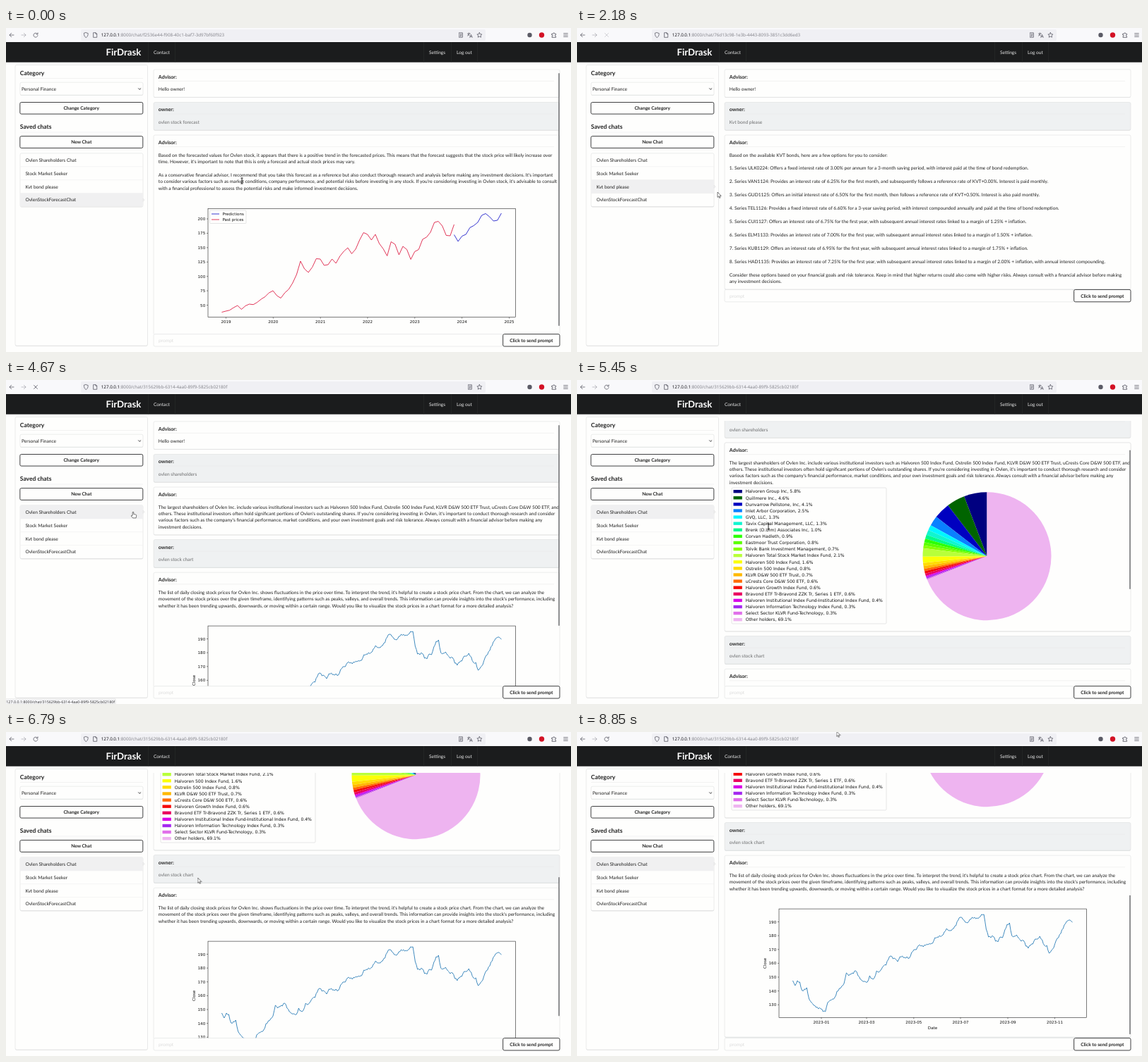
These frames come from a looping animation (800x460 px, 8880 ms). An HTML page:

```html
<!DOCTYPE html>
<html lang="en">
<head>
<meta charset="utf-8">
<title>Finance chat</title>
<style>
html,body{margin:0;width:800px;height:460px;overflow:hidden;background:#fefefd}
svg{display:block}
text{font:6.61px Lato,sans-serif;fill:#212121;text-rendering:geometricPrecision;white-space:pre}
.bold{font-weight:700}
.h4{font-size:7.08px;font-weight:700}
.h3{font-size:8.5px;font-weight:700}
.brand{font-size:13.2px;font-weight:700;fill:#fff}
.nav{fill:#e8e8e8}
.dim{fill:#6b6c6d}
.hint{fill:#dcdcdc}
.url{font-family:"Noto Sans",sans-serif;font-size:6.22px;fill:#15141a}
.tip{font-family:"Noto Sans",sans-serif;font-size:5.37px;fill:#333}
.tick{font-family:"DejaVu Sans",sans-serif;font-size:5.57px;fill:#111}
.leg{font-family:"DejaVu Sans",sans-serif;font-size:6.1px;fill:#111}
.mid{text-anchor:middle}
.end{text-anchor:end}
.ico{fill:none;stroke:#5b5b66;stroke-width:.8;stroke-linecap:round;stroke-linejoin:round}

/* one loop: 1% = 88.8 ms */
.a,.b,.c,.pie,.bare,.low,.reload,.stop,.lang,.reader,.tipB,.tipC,.hovB,.hovC,.beam,.arrow,.hand{animation:8880ms step-end infinite}
.a{animation-name:a}.b{animation-name:b}.c{animation-name:c}
.pie{animation-name:pie}.bare{animation-name:bare}.low{animation-name:low}
.reload{animation-name:reload}.stop{animation-name:stop}
.lang{animation-name:lang}.reader{animation-name:reader}
.tipB{animation-name:tipB}.tipC{animation-name:tipC}
.hovB{animation-name:hovB}.hovC{animation-name:hovC}
.beam{animation-name:beam}.arrow{animation-name:arrow}.hand{animation-name:hand}
@keyframes a{0%{opacity:1}22.5%{opacity:0}}
@keyframes b{0%,51%{opacity:0}22.5%{opacity:1}}
@keyframes c{0%{opacity:0}51%{opacity:1}}
@keyframes pie{0%{opacity:0}54.6%{opacity:1}}
@keyframes bare{0%{opacity:1}54.6%{opacity:0}}
@keyframes low{0%{transform:translateY(-200px)}54.6%{transform:none}}
@keyframes reload{0%,27%,54.6%{opacity:1}21.4%,50%{opacity:0}}
@keyframes stop{0%,27%,54.6%{opacity:0}21.4%,50%{opacity:1}24.3%{opacity:.3}}
@keyframes lang{0%,54.6%{opacity:1}51%{opacity:0}}
@keyframes reader{0%,54.6%{transform:none}51%{transform:translateX(13px)}}
@keyframes tipB{0%,22.5%{opacity:0}10.6%{opacity:1}}
@keyframes tipC{0%,54.6%{opacity:0}42.2%{opacity:1}}
@keyframes hovB{0%,22.5%{opacity:0}10.6%{opacity:1}}
@keyframes hovC{0%,51%{opacity:0}42.2%{opacity:1}}
@keyframes beam{0%,56%{opacity:1}9%,64%{opacity:0}}
@keyframes arrow{0%,10.6%,42.2%,56%{opacity:0}9%,22.7%,54.6%,64%{opacity:1}}
@keyframes hand{0%,22.7%,54.6%{opacity:0}10.6%,42.2%{opacity:1}}

@property --s{syntax:'<number>';inherits:true;initial-value:0}
.view{animation:scroll 8880ms cubic-bezier(.3,.5,.4,1) infinite}
.roll{transform:translateY(calc(var(--s)*-1px))}
.thumb{transform:translateY(calc(var(--s)*.563px))}
@keyframes scroll{
0%,59.6%{--s:0}61.3%,61.8%{--s:63}63.6%,68.5%{--s:126}
70.3%,73.2%{--s:189}75%,80%{--s:252}81.6%,to{--s:298}}
.cursor{animation:move 8880ms ease-in-out infinite}
@keyframes move{
0%,3.4%{transform:translate(334px,217px)}
10.6%{transform:translate(192px,226px)}
13.5%{transform:translate(160px,226px)}
20.3%{transform:translate(170px,226px)}
22.5%{transform:translate(184px,228px)}
24.5%,40.5%{transform:translate(199px,233px)}
42.2%{transform:translate(193px,191px)}
46.4%{transform:translate(160px,192px)}
50%{transform:translate(174px,188px)}
52.6%,54%{transform:translate(180px,187px)}
57.4%,63.6%{transform:translate(271px,208px)}
70%,87.4%{transform:translate(271.5px,207px)}
97.3%,to{transform:translate(367.5px,-1px)}}
</style>
</head>
<body>
<script>
const esc = s => s.replace(/&/g, '&amp;');
const text = (x, y, s, cls = '', size = 6.61) =>
  `<text x="${x}" y="${y + size * .365}" class="${cls}">${esc(s)}</text>`;
const rect = (x, y, w, h, fill, more = '') =>
  `<rect x="${x}" y="${y}" width="${w}" height="${h}" fill="${fill}" ${more}/>`;
const line = (x1, y1, x2, y2, c = '#e4e4e4', w = .5) =>
  `<path d="M${x1} ${y1}L${x2} ${y2}" stroke="${c}" stroke-width="${w}"/>`;
const poly = (pts, c) =>
  `<path d="M${pts.map(p => p.map(n => n.toFixed(2))).join('L')}" fill="none" stroke="${c}" stroke-width=".85" stroke-linejoin="round"/>`;
const icon = (d, more = '') => `<path class="ico" d="${d}" ${more}/>`;
const group = (cls, ...parts) => `<g class="${cls}">${parts.join('')}</g>`;

const EDGE = 'stroke="#d9dada" stroke-width=".5" rx="2"';
const DARK = 'stroke="#2b2c2d" stroke-width=".9" rx="2"';
const PITCH = 9.44;

const panel = (x, y, w, h, fill = '#fefefd') =>
  rect(x, y + .8, w, h, '#e3e4e4', 'rx="2"') + rect(x, y, w, h, fill, EDGE);
const lines = (y, rows, cls) =>
  rows.map((s, i) => s && text(215.8, y + i * PITCH, s, cls)).join('');
const heading = (y, who) =>
  text(215.8, y + 10.4, who + ':', 'h4', 7.08) + line(216, y + 16.6, 776, y + 16.6);
const cardHeight = n => 39.5 + (n - 1) * PITCH;
function card(y, who, rows, h = cardHeight(rows.length)) {
  const user = who === 'owner';
  return panel(209, y, 575, h, user ? '#eff1f2' : '#fefefd') + heading(y, who) +
    lines(y + 28.2, rows, user ? 'dim' : '');
}
const greeting = card(58.8, 'Advisor', ['Hello owner!']);
const button = (x, y, w, h, s) =>
  rect(x, y, w, h, '#fefefd', DARK) + text(x + w / 2, y + h / 2, s, 'bold mid');
const prompt = y => rect(209, y, 494, 17.4, '#fefefd', EDGE) +
  text(216, y + 8.8, 'prompt', 'hint') + button(703.7, y, 80.3, 17.4, 'Click to send prompt');
const thumb = (h, cls = '') => rect(782.2, 64, 1.6, h, '#77787a', `rx=".8" class="${cls}"`);

function axes(top, yTicks, yPos, xTicks) {
  const low = top + 154.3;
  let out = '';
  for (const v of yTicks)
    out += line(284, yPos(v), 286, yPos(v), '#111', .5) + text(282.2, yPos(v), '' + v, 'tick end', 5.57);
  for (const [x, s] of xTicks)
    out += line(x, low, x, low + 2, '#111', .5) + text(x, low + 6.3, s, 'tick mid', 5.57);
  return out + rect(286, top, 435.3, 154.3, 'none', 'stroke="#111" stroke-width=".55"');
}
const range = (from, to, step) =>
  Array.from({ length: (to - from) / step + 1 }, (_, i) => from + i * step);

function forecastChart() {
  const past = [403.5, 402, 400.7, 397, 394, 399.5, 394.5, 392, 392.7, 389.5, 385, 381.5, 376, 373, 380,
    383.5, 376, 371, 362, 350, 331, 342, 347, 339.5, 327.5, 328, 337, 336, 328, 334,
    324, 317, 312, 320.5, 314, 301, 290.5, 293, 301, 293, 306, 313.5, 323.5, 303.5, 307,
    322, 310, 314.5, 328.5, 317.5, 314.5, 300, 297, 290, 276, 274.5, 281, 294.5, 295, 279];
  const next = [293.5, 303, 295.5, 293, 283.5, 280.5, 276, 266, 263.5, 268, 274, 273, 263];
  const months = (ys, x) => ys.map((y, i) => [x + i * 5.576, y]);
  const red = '#dc143c', blue = '#1414c8';
  return axes(256.4, range(50, 200, 25), v => 393.5 - (v - 50) * .8167,
      range(2019, 2025, 1).map((y, i) => [311.5 + i * 66.83, '' + y])) +
    poly(months(next, 634.5), blue) + poly(months(past, 305.5), red) +
    rect(288.5, 259, 51.5, 18.5, '#fefefd', 'stroke="#ccc" stroke-width=".5" rx="1"') +
    line(291, 264, 302, 264, blue, .85) + text(306.4, 264, 'Predictions', 'tick', 5.57) +
    line(291, 272, 302, 272, red, .85) + text(306.4, 272, 'Past prices', 'tick', 5.57);
}

function closeChart() {
  const ys = [353, 360, 353, 355, 367, 365, 363, 379, 384, 388, 391, 393, 393, 397, 397, 384, 381, 379, 377, 368,
    364, 361, 357, 342, 346, 344, 343, 339, 346, 351, 354, 354, 355, 346, 350, 349, 339, 341, 337, 332,
    331, 323, 318, 322, 322, 326, 319, 318, 320, 319, 321, 313, 309, 309, 303, 304, 305, 303, 302, 301,
    300, 292, 291, 289, 289, 284, 279, 282, 282, 279, 275, 267, 263, 266, 270, 271, 266, 263, 263, 264,
    263, 259, 259, 280, 291, 292, 290, 297, 298, 291, 292, 281, 273, 271, 289, 290, 288, 293, 297, 296,
    304, 307, 303, 301, 294, 294, 290, 295, 303, 303, 314, 310, 306, 296, 292, 286, 279, 272, 268, 267, 270];
  const jitter = i => Math.sin(i * 12.9898) * 1.6;
  const pts = [];
  ys.forEach((y, i) => {
    const x = 305.5 + i * 3.3;
    pts.push([x, y + 298]);
    if (i < ys.length - 1) pts.push([x + 1.65, (y + ys[i + 1]) / 2 + 298 + jitter(i)]);
  });
  const dates = [[346, '01'], [410, '03'], [476.8, '05'], [543, '07'], [610, '09'], [676.5, '11']];
  return axes(549.1, range(130, 190, 10), v => 567.5 + (190 - v) * 1.963,
      dates.map(([x, m]) => [x, '2023-' + m])) +
    poly(pts, '#1f77b4') + text(503.5, 717.5, 'Date', 'tick mid', 5.57) +
    `<g transform="translate(266 626.3) rotate(-90)">${text(0, 0, 'Close', 'tick mid', 5.57)}</g>`;
}

const holders = [
  ['Halvoren Group Inc', 5.8, '#000080'], ['Quillmere Inc.', 4.6, '#006400'],
  ['Dunvarrow Pellstone, Inc', 4.1, '#0000c0'], ['Inlet Arbor Corporation', 2.5, '#0a80ff'],
  ['GVQ, LLC', 1.3, '#00f6ff'], ['Tavix Capital Management, LLC', 1.3, '#10f5d0'],
  ['Brenk (D.Ulm) Associates Inc', 1.0, '#00fa8c'], ['Corvan Hadleth', .9, '#2cff05'],
  ['Eastmoor Trust Corporation', .8, '#5cff00'], ['Tolvik Bank Investment Management', .7, '#86ff00'],
  ['Halvoren Total Stock Market Index Fund', 2.1, '#b8ff3a'], ['Halvoren 500 Index Fund', 1.6, '#fbff05'],
  ['Ostrelin 500 Index Fund', .8, '#ffdc00'], ['KLVR D&W 500 ETF Trust', .7, '#ffb800'],
  ['uCrests Core D&W 500 ETF', .6, '#ff6a00'], ['Halvoren Growth Index Fund', .6, '#f50a0a'],
  ['Bravond ETF Tr-Bravond ZZK Tr, Series 1 ETF', .6, '#ea0060'],
  ['Halvoren Institutional Index Fund-Institutional Index Fund', .4, '#d800e8'],
  ['Halvoren Information Technology Index Fund', .3, '#a428f0'],
  ['Select Sector KLVR Fund-Technology', .3, '#e070ea'], ['Other holders', 69.1, '#eeb4f0']];

function pieChart() {
  const total = holders.reduce((n, h) => n + h[1], 0), r = 91;
  let sum = 0, out = rect(219, 216, 219, 193, '#fefefd', 'stroke="#ccc" stroke-width=".5" rx="1.5"');
  const at = v => {
    const q = v / total * 2 * Math.PI;
    return `${(580.5 - r * Math.sin(q)).toFixed(2)} ${(313.2 - r * Math.cos(q)).toFixed(2)}`;
  };
  holders.forEach(([name, part, color], i) => {
    const y = 221.2 + i * 9.1, from = at(sum);
    sum += part;
    out += `<path d="M580.5 313.2L${from}A${r} ${r} 0 ${+(part > 50)} 0 ${at(sum)}Z" fill="${color}"/>` +
      rect(221.5, y - 2.2, 12.3, 4.4, color) + text(238.7, y, `${name}, ${part.toFixed(1)}%`, 'leg', 6.1);
  });
  return out;
}

const forecastText = [
  'Based on the forecasted values for Ovlen stock, it appears that there is a positive trend in the forecasted prices. This means that the forecast suggests that the stock price will likely increase over',
  "time. However, it's important to note that this is only a forecast and actual stock prices may vary.", '',
  "As a conservative financial advisor, I recommend that you take this forecast as a reference but also conduct thorough research and analysis before making any investment decisions. It's important",
  "to consider various factors such as market conditions, company performance, and potential risks before investing in any stock. If you're considering investing in Ovlen stock, it's advisable to consult",
  'with a financial professional to assess the potential risks and make informed investment decisions.'];
const bonds = [
  'ULK0224: Offers a fixed interest rate of 3.00% per annum for a 3-month saving period, with interest paid at the time of bond redemption.',
  'VAN1124: Provides an interest rate of 6.25% for the first month, and subsequently follows a reference rate of KVT+0.00%. Interest is paid monthly.',
  'GUD1125: Offers an initial interest rate of 6.50% for the first month, then follows a reference rate of KVT+0.50%. Interest is also paid monthly.',
  'TEL1126: Provides a fixed interest rate of 6.60% for a 3-year saving period, with interest compounded annually and paid at the time of bond redemption.',
  'CUI1127: Offers an interest rate of 6.75% for the first year, with subsequent annual interest rates linked to a margin of 1.25% + inflation.',
  'ELM1133: Provides an interest rate of 7.00% for the first year, with subsequent annual interest rates linked to a margin of 1.50% + inflation.',
  'KUB1129: Offers an interest rate of 6.95% for the first year, with subsequent annual interest rates linked to a margin of 1.75% + inflation.',
  'HAD1135: Provides an interest rate of 7.25% for the first year, with subsequent annual interest rates linked to a margin of 2.00% + inflation, with annual interest compounding.'];
const bondText = ['Based on the available KVT bonds, here are a few options for you to consider:', '',
  ...bonds.flatMap((s, i) => [`${i + 1}. Series ${s}`, '']),
  'Consider these options based on your financial goals and risk tolerance. Keep in mind that higher returns could also come with higher risks. Always consult with a financial advisor before making',
  'any investment decisions.'];
const holderText = [
  'The largest shareholders of Ovlen Inc. include various institutional investors such as Halvoren 500 Index Fund, Ostrelin 500 Index Fund, KLVR D&W 500 ETF Trust, uCrests Core D&W 500 ETF, and',
  "others. These institutional investors often hold significant portions of Ovlen's outstanding shares. If you're considering investing in Ovlen, it's important to conduct thorough research and consider",
  "various factors such as the company's financial performance, market conditions, and your own investment goals and risk tolerance. Always consult with a financial advisor before making any",
  'investment decisions.'];
const closeText = [
  "The list of daily closing stock prices for Ovlen Inc. shows fluctuations in the price over time. To interpret the trend, it's helpful to create a stock price chart. From the chart, we can analyze the",
  "movement of the stock prices over the given timeframe, identifying patterns such as peaks, valleys, and overall trends. This information can provide insights into the stock's performance, including",
  'whether it has been trending upwards, downwards, or moving within a certain range. Would you like to visualize the stock prices in a chart format for a more detailed analysis?'];

const HOST = '127.0.0.1', PATH = ':8000/chat/';
const idA = 'f2536e44-f908-40c1-baf7-3d97bf60f923';
const idB = '76d13c98-1e3b-4443-8093-3851c3dd6ed3';
const idC = '315629bb-6314-4aa0-89f9-5825cb02180f';
const address = (cls, id) =>
  `<text x="134.8" y="12.3" class="url ${cls}">${HOST}<tspan fill="#85858c">${PATH}${id}</tspan></text>`;
const status = (cls, id) => group(cls,
  rect(-1, 453, 156, 8, '#f9f9fb', 'stroke="#ccc" stroke-width=".5"'), text(.3, 457, HOST + PATH + id, 'tip', 5.37));

const toolbar = rect(0, 0, 800, 20, '#f9f9fb') + rect(106, 2, 573, 16, '#f0f0f4', 'rx="2"') +
  icon('M11 10H5m2.6-2.7L5 10l2.6 2.7') +
  icon('M22 10h6m-2.6-2.7L28 10l-2.6 2.7', 'opacity=".45"') +
  group('reload', icon('M44.6 8.6A3 3 0 1 0 45 10.6M45 6.8v2.1h-2.1')) +
  group('stop', icon('M39.5 7.5l5 5m0-5l-5 5')) +
  icon('M113.3 6.6l2.9 1c0 3-.8 4.8-2.9 6-2.1-1.2-2.9-3-2.9-6z') +
  icon('M124 6.7h3l1.7 1.7v4.9H124zM127 6.7v1.7h1.7') +
  address('a', idA) + address('b', idB) + address('c', idC) +
  group('reader', icon('M641.6 6.8h4.8v6.4h-4.8zM643 8.8h2M643 10.2h2M643 11.6h1.2')) +
  group('lang', icon('M653.5 8h4M655.5 7v1c0 1.5-1 2.6-2 3M654.3 9.3l2 1.5M656.8 13.4l1.7-4 1.7 4M657.4 12.2h2.2')) +
  icon('M670.4 6.5l1 2.2 2.5.3-1.8 1.7.4 2.5-2.1-1.2-2.1 1.2.4-2.5-1.8-1.7 2.5-.3z') +
  '<circle cx="741.5" cy="10" r="3.2" fill="#5b5b66"/><circle cx="758.5" cy="10" r="3.7" fill="#d31225"/>' +
  icon('M773 8.2h1.8a1 1 0 1 1 1.9 0h1.9v1.7a1 1 0 1 0 0 1.9v1.6H773v-1.6a1 1 0 1 0 0-1.9z') +
  icon('M789.7 7.7h5.6M789.7 10h5.6M789.7 12.3h5.6');

const nav = rect(0, 19.7, 800, 29, '#1b1c1d') + text(141.5, 34.5, 'FirDrask', 'brand', 13.2) +
  [201.5, 239.5, 591.5, 630.5, 667.5].map(x => line(x, 20, x, 48.5, '#2d2e2f')).join('') +
  text(209, 34.4, 'Contact', 'nav') + text(599, 34.4, 'Settings', 'nav') + text(638, 34.4, 'Log out', 'nav');

const chats = ['Ovlen Shareholders Chat', 'Stock Market Seeker', 'Kvt bond please', 'OvlenStockForecastChat'];
const rowY = i => 177.8 + i * 18.95;
const row = (i, cls, fill) => group(cls, rect(20, rowY(i), 174, 18.95, fill));
const active = (i, cls) => group(cls, rect(20, rowY(i), 174, 18.95, '#f0f0f1'),
  `<path d="M194 ${rowY(i) + 7.3}l2.2 2.2-2.2 2.2z" fill="#f0f0f1" stroke="#d9dada" stroke-width=".4"/>`);
const sidebar = panel(13, 52.5, 187.5, 398.5) +
  text(19.8, 63.4, 'Category', 'h3', 8.5) + line(20, 71.5, 194, 71.5) +
  panel(20, 77.2, 174, 18) + text(22, 86.4, 'Personal Finance') +
  '<path d="M187.3 85.5l1.9 1.9 1.9-1.9" fill="none" stroke="#222" stroke-width=".9"/>' +
  button(19.8, 105.5, 174, 16.6, 'Change Category') +
  text(19.8, 140, 'Saved chats', 'h3', 8.5) + line(20, 148, 194, 148) +
  button(19.8, 153.6, 174, 16.8, 'New Chat') +
  panel(20, 177.8, 174, 75.8) +
  active(3, 'a') + active(2, 'b') + active(0, 'c') + row(2, 'hovB', '#f4f4f4') + row(0, 'hovC', '#f3f3f3') +
  [1, 2, 3].map(i => line(20, rowY(i), 194, rowY(i), '#ececec')).join('') +
  chats.map((s, i) => text(27.4, rowY(i) + 9.4, s)).join('');

const clip = s => `<g clip-path="url(#view)">${s}</g>`;
const pageA = group('a',
  clip(greeting + card(105.5, 'owner', ['ovlen stock forecast']) +
    card(152, 'Advisor', forecastText, 290) + forecastChart() + thumb(359)),
  prompt(434.6));
const pageB = group('b', greeting, card(105.5, 'owner', ['Kvt bond please']),
  card(152, 'Advisor', bondText, 219), prompt(371.4));
const pageC = group('c',
  clip(group('view',
    group('roll', greeting, card(105.5, 'owner', ['ovlen shareholders']),
      card(152, 'Advisor', holderText),
      group('pie', panel(209, 152, 575, 267.8), heading(152, 'Advisor'), lines(180.2, holderText), pieChart()),
      group('low', card(426.6, 'owner', ['ovlen stock chart']), card(473.2, 'Advisor', closeText, 258), closeChart())),
    group('bare', thumb(285)), group('pie', thumb(197.5, 'thumb')))),
  prompt(434.6));

const outline = 'stroke="#222" stroke-width=".6" stroke-linejoin="round" fill="#fff"';
const cursor = group('cursor',
  group('beam', '<path d="M-1.6-4h3.2M0-4v8M-1.6 4h3.2" stroke="#111" stroke-width=".9"/>'),
  group('arrow', `<path d="M0 0v7.4l1.7-1.5 1.1 2.5 1.2-.5-1.1-2.5h2.3z" ${outline}/>`),
  group('hand', `<path d="M-.8 5.4V.7q.8-1 1.6 0v2.8l3 .6q1 .3.9 1.4l-.6 3.4H-.4L-2.9 6q.4-1.3 2.1-.6z" ${outline}/>`));

document.body.innerHTML = `<svg width="800" height="460" viewBox="0 0 800 460">
<clipPath id="view"><rect x="205" y="58.5" width="582" height="375.7"/></clipPath>
${rect(0, 0, 800, 460, '#fefefd')}${sidebar}${pageA}${pageB}${pageC}${nav}${toolbar}
${status('tipB', idB)}${status('tipC', idC)}${cursor}</svg>`;
</script>
</body>
</html>
```
